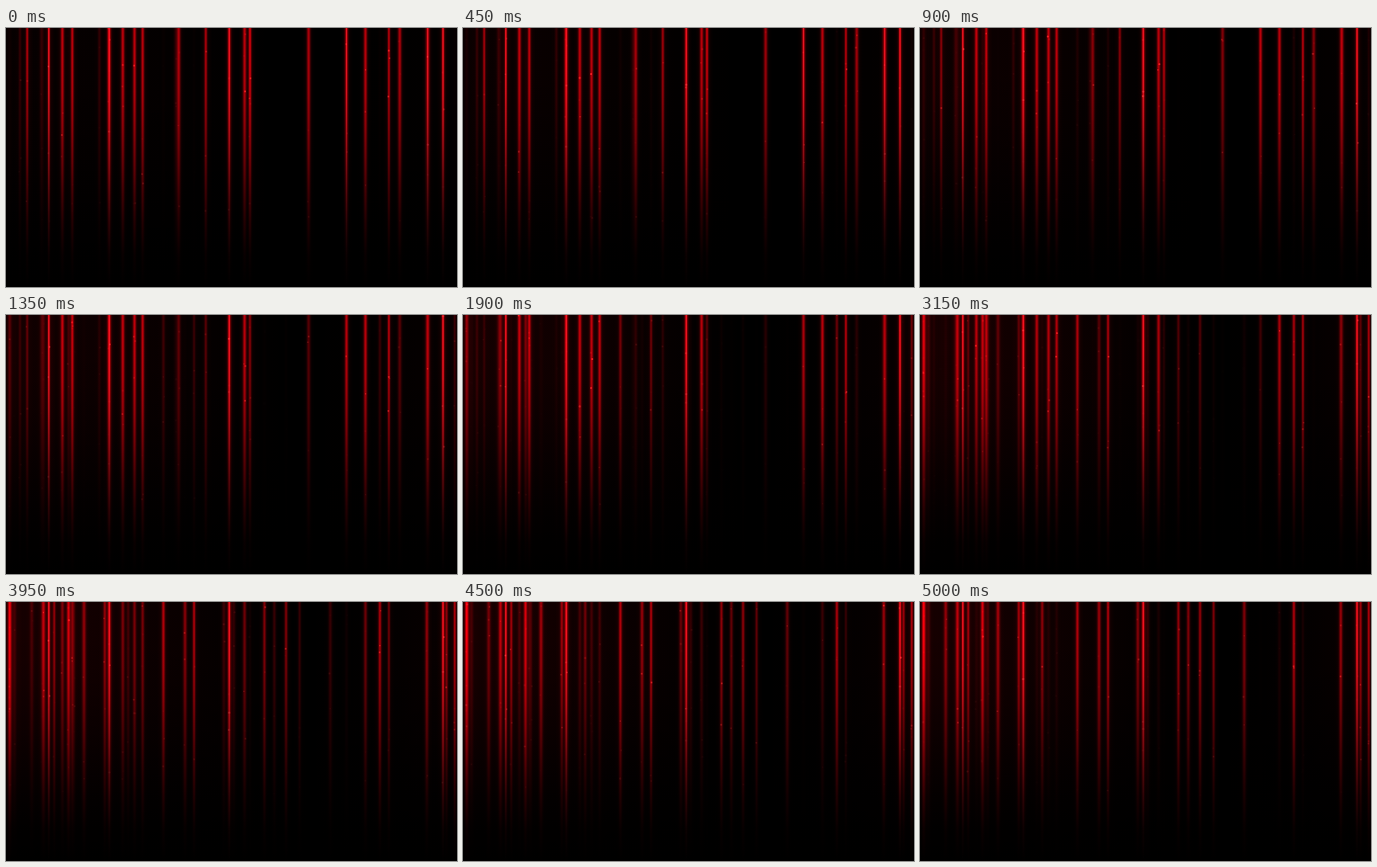
Animation of 500 by 288 pixels, one loop 5050 ms. Source, as an HTML page with a canvas:

```html
<!DOCTYPE html>
<html lang="en">
<head>
<meta charset="utf-8">
<title>Red light curtain</title>
<style>
  html, body { margin: 0; width: 100%; height: 100%; overflow: hidden; background: #000; }
  canvas { display: block; width: 100%; height: 100%; }
</style>
</head>
<body>
<canvas id="stage" width="500" height="288"></canvas>
<script>
const ctx = document.getElementById('stage').getContext('2d');
const W = 500, H = 288, LOOP = 5050, STEP = 50, SPARK_RANGE = 215;

let seed = 71;
const random = (low = 0, high = 1) => {
  seed = seed * 16807 % 2147483647;
  return low + (high - low) * seed / 2147483647;
};

// Brightness over time in seconds; "half" is when a beam passes half its peak.
const sigmoid = v => 1 / (1 + Math.exp(-v / .45));
const fade = (peak, half) => t => peak * sigmoid(half - t);
const rise = (peak, half) => t => peak * sigmoid(t - half);
const steady = peak => () => peak;

const makeSpark = () => ({
  dx: random(-1, 1),
  y: random(0, SPARK_RANGE),
  speed: random(12, 44),
  size: random(.6, 1.1),
  phase: random(0, 6.28)
});
const makeBeam = (x, level) => ({
  x, level, soft: random(1.3, 2), sparks: Array.from({ length: 3 }, makeSpark)
});
const group = (level, ...places) => places.map(x => makeBeam(x, level));

const beams = [
  ...group(steady(.9), 47, 114, 247, 484),
  ...group(fade(.8, 1.3), 23, 191, 221, 270, 335, 436),
  ...group(fade(.85, 2.8), 377, 467),
  ...group(fade(.82, 4.1), 62, 73, 129, 142, 151, 264, 398, 424),
  ...group(rise(.75, 1.7), 4, 41, 69, 174, 208, 414, 497),
  ...group(rise(.65, 3.1), 53, 86, 109, 198, 286, 310, 466, 488),
  ...group(rise(.65, 4.2), 28, 135, 241, 297, 325, 359)
];
// Faint beams fill the gaps, more of them towards the left.
for (let i = 0; i < 12; i++) {
  const change = i % 2 ? fade : rise;
  beams.push(makeBeam(Math.floor(320 * random() ** 1.3), change(.2, random(1, 4))));
}

function gradient(x, y, color, alphaAt) {
  const result = ctx.createLinearGradient(0, 0, x, y);
  for (let p = 0; p <= 1; p += .125) result.addColorStop(p, `rgba(${color},${alphaAt(p)})`);
  return result;
}
const shade = gradient(0, H, '0,0,0', p => {
  const u = Math.max(0, (p - .1) / .9);
  return u * u * (3 - 2 * u);
});
const haze = gradient(W, 0, '240,0,8', p => .09 * Math.cos(p * 2.3) ** 2);

function drawBeam({ x, soft }, level) {
  ctx.fillStyle = '#e8000c';
  for (let dx = -6; dx <= 6; dx++) {
    ctx.globalAlpha = level * (.85 * Math.exp(-((dx / soft) ** 2)) + .1 * Math.exp(-dx * dx / 16));
    ctx.fillRect(x + dx, 0, 1, H);
  }
  if (level > .84) {
    ctx.globalAlpha = .2;
    ctx.fillStyle = '#ff7888';
    ctx.fillRect(x, 0, 1, H);
  }
}

function drawSparks({ x, sparks }, level, t) {
  for (const { dx, y, speed, size, phase } of sparks) {
    const twinkle = .55 + .45 * Math.sin(phase + t * 4);
    ctx.globalAlpha = level * twinkle * .6;
    ctx.fillStyle = '#ff5048';
    ctx.beginPath();
    ctx.arc(x + .5 + dx, (y + speed * t) % SPARK_RANGE, size, 0, 7);
    ctx.fill();
  }
}

function fillStage(style, alpha = 1) {
  ctx.globalAlpha = alpha;
  ctx.fillStyle = style;
  ctx.fillRect(0, 0, W, H);
}

function draw(t) {
  ctx.globalCompositeOperation = 'source-over';
  fillStage('#000');
  ctx.globalCompositeOperation = 'lighter';
  fillStage(haze, Math.min(1, .3 + t / 3));
  for (const beam of beams) {
    const level = beam.level(t);
    drawBeam(beam, level);
    drawSparks(beam, level, t);
  }
  ctx.globalCompositeOperation = 'source-over';
  fillStage(shade);
}

const start = performance.now();
function frame() {
  const elapsed = (performance.now() - start) % LOOP;
  draw(Math.floor(elapsed / STEP) * STEP / 1000);
  requestAnimationFrame(frame);
}
frame();
</script>
</body>
</html>
```
